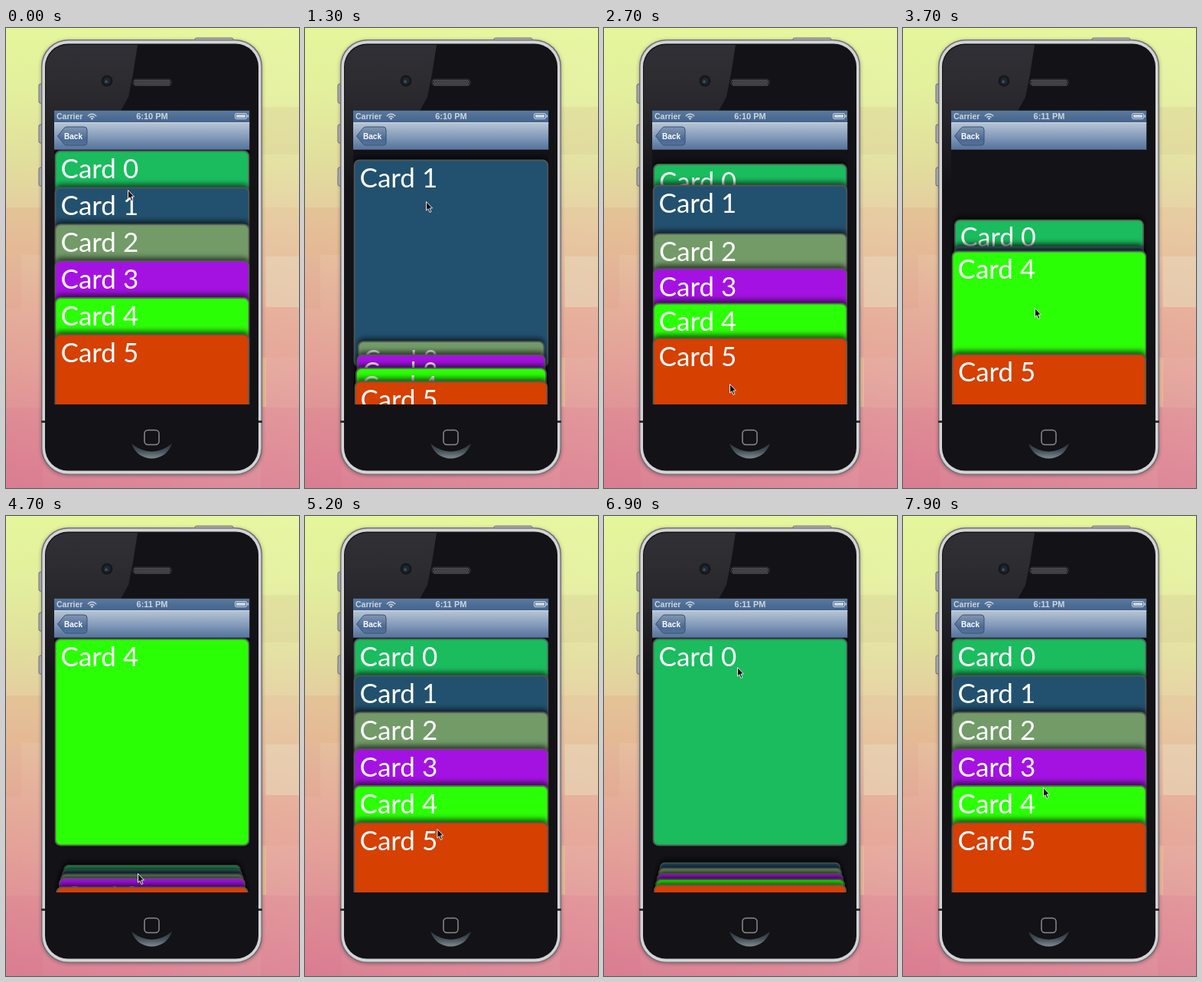
Write an HTML page with a canvas that moves like this. It is 383 by 600 pixels and loops after 8000 ms.

```html
<!DOCTYPE html>
<html lang="en">
<head>
<meta charset="utf-8">
<title>Card stack</title>
<style>
  html, body { margin: 0; width: 100%; height: 100%; overflow: hidden; }
  canvas { display: block; width: 383px; height: 600px; }
</style>
</head>
<body>
<canvas id="stage" width="383" height="600"></canvas>
<script>
const ctx = document.getElementById('stage').getContext('2d');
const LOOP = 8000, STEP = 100, MOVE = 400;
const SANS = '"Liberation Sans", Arial, sans-serif';
const COLORS = ['#1abc5e', '#22516f', '#729b68', '#a412e2', '#2bff06', '#d64000'];
const SCREEN = { x: 63, y: 107.5, w: 255.5, h: 383.5 };
const CARD = { mid: 191, w: 254, h: 270, top: 160, gap: 47.9 };

// Which card opens, and when it opens and closes.
const VISITS = [
  { card: 1, open: 1030, close: 2360 },
  { card: 4, open: 3550, close: 4800 },
  { card: 0, open: 6300, close: 7440 }
];

// Pointer stops: time, x, y.
const STOPS = [
  [0, 159, 211], [900, 158, 226], [1500, 158, 226], [2200, 164, 464],
  [2800, 164, 464], [3400, 172, 365], [3900, 172, 365], [4500, 172, 466],
  [4900, 172, 466], [5900, 174, 197], [7100, 174, 197], [7380, 178, 464],
  [7500, 178, 464], [7900, 183, 354], [8000, 183, 354]
];

const clamp = v => Math.min(1, Math.max(0, v));
const smooth = v => { const u = clamp(v); return u * u * (3 - 2 * u); };
const mix = (a, b, u) => a + (b - a) * u;

function gradient(x0, y0, x1, y1, colors) {
  const g = ctx.createLinearGradient(x0, y0, x1, y1);
  colors.forEach((c, i) => g.addColorStop(i / (colors.length - 1), c));
  return g;
}

function rect(x, y, w, h, fill) {
  ctx.fillStyle = fill;
  ctx.fillRect(x, y, w, h);
}

function round(x, y, w, h, r, fill, stroke, line = 1) {
  ctx.beginPath();
  ctx.roundRect(x, y, w, h, r);
  if (fill) { ctx.fillStyle = fill; ctx.fill(); }
  if (stroke) { ctx.strokeStyle = stroke; ctx.lineWidth = line; ctx.stroke(); }
}

function disc(x, y, r, fill) {
  ctx.beginPath();
  ctx.arc(x, y, r, 0, Math.PI * 2);
  ctx.fillStyle = fill;
  ctx.fill();
}

function label(str, x, y, font, fill, align = 'left') {
  ctx.font = font;
  ctx.textAlign = align;
  ctx.fillStyle = fill;
  ctx.fillText(str, x, y);
}

function drawWall() {
  rect(0, 0, 383, 600, gradient(0, 0, 0, 600,
    ['#e4f69a', '#e3ef9d', '#e1df9c', '#e5c9a0', '#e5b39b', '#e4a298', '#df9096', '#da8094']));
  rect(0, 0, 383, 600, gradient(0, 0, 383, 0,
    ['rgba(255,255,220,0)', 'rgba(255,255,220,.05)', 'rgba(255,255,220,.12)']));
  rect(0, 234, 48, 62, 'rgba(226,170,125,.3)');
  rect(0, 296, 20, 70, 'rgba(215,140,115,.12)');
  rect(0, 495, 48, 105, 'rgba(210,90,125,.1)');
  rect(333, 103, 50, 62, 'rgba(215,200,145,.3)');
  rect(333, 234, 50, 64, 'rgba(225,180,140,.2)');
  rect(340, 298, 43, 66, 'rgba(232,214,182,.6)');
  rect(333, 364, 50, 66, 'rgba(225,150,135,.2)');
  rect(333, 430, 7, 64, 'rgba(235,200,150,.6)');
  rect(333, 495, 50, 105, 'rgba(210,90,125,.12)');
}

function drawPhone() {
  const metal = gradient(0, 12, 0, 18, ['#777', '#e4e4e4', '#888']);
  round(247, 13, 50, 6, 2, metal, '#777');
  for (const [y, h] of [[73, 25], [126, 24], [182, 24]])
    round(43, y, 6, h, 2, '#b9b9ba', '#6d6d70');

  ctx.save();
  ctx.shadowColor = 'rgba(60,30,40,.4)';
  ctx.shadowBlur = 5;
  ctx.shadowOffsetY = 1;
  round(46, 15, 289, 568, 35, '#727276');
  ctx.restore();
  round(47.5, 16.5, 286, 565, 34, '#d3d4d6');
  rect(46, 512, 6, 3, '#333');
  rect(329, 512, 6, 3, '#333');
  round(51, 20.5, 279, 557, 30, '#131217');

  ctx.save();
  ctx.beginPath();
  ctx.roundRect(52, 22, 277, 554, 29);
  ctx.clip();
  ctx.beginPath();
  ctx.moveTo(52, 22);
  for (const [x, y] of [[172, 22], [166, 60], [160, 90], [150, 108], [52, 108]]) ctx.lineTo(x, y);
  ctx.fillStyle = gradient(0, 22, 0, 108, ['#303036', '#2c2c31', '#26262b']);
  ctx.fill();
  rect(52, 108, 11, 100, gradient(0, 108, 0, 208, ['#26262b', '#131217']));
  ctx.restore();

  disc(132, 69, 7.5, '#17171c');
  disc(132, 69, 4.5, '#1d2830');
  disc(131, 70, 1.8, '#3a566a');
  round(165, 66, 52, 10, 5, '#2f2f33', '#1b1b1f');
  ctx.fillStyle = '#77777b';
  for (let y = 68; y < 75; y += 2)
    for (let x = 168 + y / 2 % 2; x < 214; x += 2) ctx.fillRect(x, y, 1, 1);

  ctx.beginPath();
  ctx.moveTo(164, 542);
  ctx.quadraticCurveTo(190.5, 563, 217, 542);
  ctx.bezierCurveTo(208, 568, 173, 568, 164, 542);
  ctx.fillStyle = gradient(0, 542, 0, 562, ['#2b3338', '#43525a', '#868d90']);
  ctx.fill();
  round(181, 524.5, 19, 19, 4.5, '#131217', '#8b8b8f', 1.5);
}

function drawBars(t) {
  const { x, y, w } = SCREEN;
  rect(x, y, w, 16, gradient(0, y, 0, 123, ['#5d7a9e', '#4f6e95', '#46658c']));
  const pale = '#c9d5e3', small = `bold 10.5px ${SANS}`;
  label('Carrier', 66, 119, small, pale);
  label(t < 3500 ? '6:10 PM' : '6:11 PM', 191, 119, `bold 11px ${SANS}`, pale, 'center');

  ctx.strokeStyle = pale;
  ctx.lineWidth = 1.5;
  for (const r of [3.7, 6.8]) {
    ctx.beginPath();
    ctx.arc(112.5, 119, r, -Math.PI * .8, -Math.PI * .2);
    ctx.stroke();
  }
  disc(112.5, 118.2, 1.3, pale);
  round(299.5, 111.5, 15, 7, 1.5, null, pale);
  rect(301, 113, 12, 4, pale);
  rect(315.5, 113.5, 1.5, 3, pale);

  rect(x, 123, w, 36, gradient(0, 123, 0, 159,
    ['#b8c7d8', '#a5b6cb', '#90a5c0', '#7d95b5', '#6682a8', '#587398']));
  rect(x, 123, w, 1, '#cdd8e4');
  rect(x, 158, w, 1, '#3f5674');

  ctx.beginPath();
  ctx.moveTo(67.5, 141);
  ctx.lineTo(76, 130.5);
  ctx.quadraticCurveTo(77.5, 129, 80, 129);
  ctx.lineTo(102, 129);
  ctx.arcTo(106, 129, 106, 133, 4);
  ctx.lineTo(106, 149);
  ctx.arcTo(106, 153, 102, 153, 4);
  ctx.lineTo(80, 153);
  ctx.quadraticCurveTo(77.5, 153, 76, 151.5);
  ctx.closePath();
  ctx.fillStyle = gradient(0, 129, 0, 153, ['#8396b0', '#6680a3', '#4a6a95', '#52729d']);
  ctx.fill();
  ctx.strokeStyle = '#3b506e';
  ctx.lineWidth = 1;
  ctx.stroke();
  label('Back', 88, 145, `bold 10px ${SANS}`, '#fff', 'center');
}

function drawCard(i, y, scale) {
  ctx.save();
  ctx.translate(CARD.mid, y);
  ctx.scale(scale, scale);
  ctx.translate(-CARD.w / 2, 0);
  ctx.save();
  ctx.shadowColor = 'rgba(0,0,0,.65)';
  ctx.shadowBlur = 7;
  ctx.shadowOffsetY = -4;
  round(0, 0, CARD.w, CARD.h, 7, COLORS[i]);
  ctx.restore();
  round(.5, .5, CARD.w - 1, CARD.h - 1, 7, null, 'rgba(88,88,86,.9)', 1.8);
  label('Card ' + i, 7.5, 36.3, '35px Lato, "Open Sans", sans-serif', '#fff');
  ctx.restore();
}

function drawCards(t) {
  const visit = VISITS.find(v => t < v.close + MOVE) || VISITS[2];
  const p = smooth((t - visit.open) / MOVE) - smooth((t - visit.close) / MOVE);
  // The stack sinks a little while it is pressed.
  const press = Math.max(0, 1 - Math.abs(t - 4700) / 180) * .037;

  ctx.save();
  ctx.beginPath();
  ctx.rect(SCREEN.x, SCREEN.y, SCREEN.w, SCREEN.h);
  ctx.clip();
  rect(SCREEN.x, 159, SCREEN.w, 332, '#131217');
  COLORS.forEach((_, i) => {
    const home = CARD.top + CARD.gap * i, depth = 5 - i;
    if (i === visit.card) drawCard(i, mix(home, CARD.top, p), 1);
    else drawCard(i, mix(home, 481 - 7.25 * depth, p + press),
      mix(1, .988 - .0148 * depth, p + press));
  });
  drawBars(t);
  ctx.restore();
}

function drawPointer(t) {
  const n = STOPS.findIndex(s => s[0] > t);
  const [t0, x0, y0] = STOPS[n - 1], [t1, x1, y1] = STOPS[n];
  const u = smooth((t - t0) / (t1 - t0));
  ctx.save();
  ctx.translate(mix(x0, x1, u), mix(y0, y1, u));
  ctx.beginPath();
  ctx.moveTo(.5, .5);
  for (const [x, y] of [[.5, 12], [3, 9.8], [5, 14.5], [7, 13.5], [5, 9.1], [8.5, 8.9]])
    ctx.lineTo(x, y);
  ctx.closePath();
  ctx.fillStyle = '#111';
  ctx.fill();
  ctx.strokeStyle = '#e8e8e8';
  ctx.lineWidth = 1;
  ctx.stroke();
  ctx.restore();
}

function frame(now) {
  const t = Math.floor(now % LOOP / STEP) * STEP;
  drawWall();
  drawPhone();
  drawCards(t);
  drawPointer(t);
  requestAnimationFrame(frame);
}
requestAnimationFrame(frame);
</script>
</body>
</html>
```
